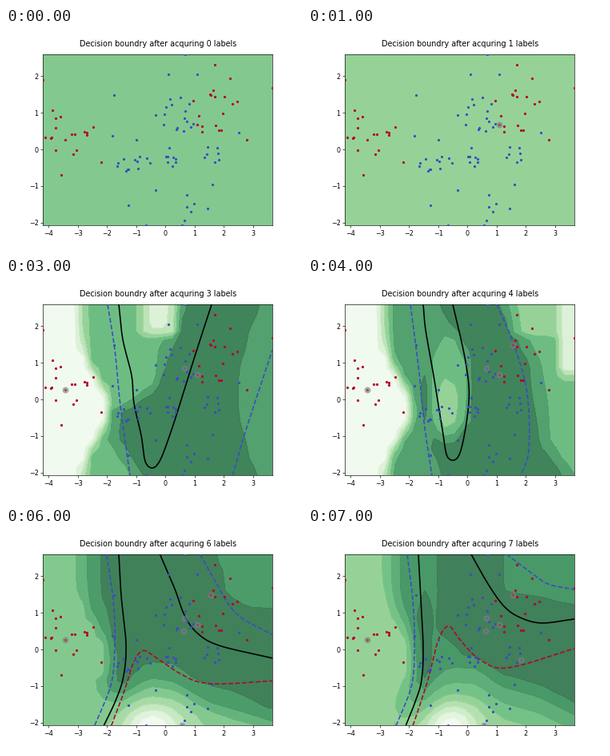
Write a matplotlib script that moves like this. It is 370 by 278 pixels and loops after 8000 ms.

```python
import numpy as np
import matplotlib.pyplot as plt
from matplotlib.animation import FuncAnimation

W, H, DPI = 370, 278, 57.8125
plt.rcParams["font.family"] = "DejaVu Sans"
fig = plt.figure(figsize=((W + .001) / DPI, (H + .001) / DPI), dpi=DPI)
ax = fig.add_axes([.125, .11, .775, .77])
XLIM, YLIM = (-4.192, 3.664), (-2.078, 2.585)
L, R, T, B = 46.25, 333, 33.36, 247.42
BLUE, RED = plt.cm.coolwarm(0.0), plt.cm.coolwarm(1.0)


def to_data(p):
    """Stage pixels to data units."""
    x = np.interp(p[:, 0], [L, R], XLIM)
    y = np.interp(p[:, 1], [T, B], YLIM[::-1])
    return np.column_stack([x, y])


def pts(flat):
    return np.array(flat, float).reshape(-1, 2)


def green(v, alpha=.75):
    return 1 - alpha + alpha * np.array(plt.cm.Greens(float(v))[:3])


# --- samples: a few fixed outliers, the rest in seeded clusters ---
rng = np.random.default_rng(4)


def cluster(n, cx, cy, rx, ry):
    r, a = np.sqrt(rng.random(n)), rng.uniform(0, 2 * np.pi, n)
    return np.column_stack([cx + rx * r * np.cos(a), cy + ry * r * np.sin(a)])


# in the order they get labelled
labelled = pts([239, 121, 74, 140.3, 223, 113, 256, 84.5, 219.5, 247,
                221.5, 129.5, 266, 165])
is_red = np.array([1, 1, 0, 1, 0, 0, 0], bool)

reds = np.vstack([
    labelled[is_red],
    pts([46, 65.5, 57.5, 103.5, 69, 184, 118.5, 168.5, 108.5, 124.5,
         261, 46, 279.5, 63, 333, 75, 301, 140.5, 289, 92.5, 234, 91.5]),
    cluster(14, 75, 137, 27, 30), cluster(12, 260, 103, 24, 37)])
blues = np.vstack([
    labelled[~is_red],
    pts([224, 33.5, 203, 58.5, 238.5, 58.5, 134.5, 84.5, 291, 131.5,
         152.5, 222, 175, 247.5, 252, 226.5, 133, 135, 163, 140, 187, 203,
         257.5, 196]),
    cluster(14, 212, 110, 26, 24), cluster(8, 207, 160, 9, 16),
    cluster(12, 157, 169, 27, 11), cluster(6, 257, 160, 10, 20),
    cluster(5, 222, 225, 17, 18)])

# --- uncertainty fields on a coarse grid, in stage pixels ---
gx, gy = np.linspace(L, R, 24), np.linspace(T, B, 20)
X, Y = np.meshgrid(gx, gy)
# all fields bulge around the left cluster
EDGE = 94 + 35 * np.exp(-((Y - 163) / 50) ** 2)


def by_y(ys, xs):
    return np.interp(Y, ys, xs)


def by_x(xs, ys):
    return np.interp(X, xs, ys)


def box(cx, cy, rx, ry):
    return np.minimum(rx - abs(X - cx), ry - abs(Y - cy))


def oval(cx, cy, rx, ry):
    return (1 - np.hypot((X - cx) / rx, (Y - cy) / ry)) * min(rx, ry)


def bump(cx, cy, rx, ry):
    return np.exp(-((X - cx) / rx) ** 2 - ((Y - cy) / ry) ** 2)


def put(z, band, n, depth, soft=12):
    """Blend z to the middle of a band where depth is positive."""
    return z + ((band + .5) / n - z) * np.clip(.5 + depth / soft, 0, 1)


def field3(n=7):
    z = put(.5 / n, 4, n, X - EDGE)
    left = by_y([33, 80, 130, 150, 165, 200, 247],
                [226, 212, 192, 180, 146, 142, 172])
    right = 291 + 24 * ((Y - 145) / 105) ** 2
    z = put(z, 5, n, X - left + 16)
    z = put(z, 4, n, oval(172, 115, 18, 24))
    z = put(z, 6, n, np.minimum(X - left, right - X))
    return put(z, 1, n, box(191, 30, 20, 40))


def field4(n=7):
    z = put(.5 / n, 4, n, X - EDGE)
    right = by_y([33, 110, 206, 247], [238, 277, 288, 318])
    left = by_y([33, 100, 180, 205, 247], [165, 197, 203, 152, 168])
    z = put(z, 5, n, np.minimum(X - EDGE - 10, right + 16 - X))
    z = put(z, 6, n, np.minimum(X - left, right - X))
    z = put(z, 6, n, oval(146, 150, 9, 28))
    z = put(z, 4, n, oval(177, 135, 24, 65))
    z = put(z, 3, n, oval(174, 158, 14, 34))
    z = put(z, 3, n, box(287, 30, 28, 42))
    return put(z, 1, n, box(333, 60, 20, 62))


def field5(n=8):
    low = by_x([120, 150, 180, 210, 260, 333], [192, 196, 178, 184, 212, 230])
    right = by_y([33, 90, 110, 160, 200], [272, 280, 302, 304, 340])
    z = put(5.5 / n, 6, n, X - 250)
    z = put(z, 7, n, np.minimum(X - EDGE - 2, right - X))
    z = put(z, 4, n, np.minimum(Y - low - 13, X - 97), 24)
    return z - .6 * bump(188, 250, 42, 28) * (Y > low)


def field7(n=9):
    low = by_x([100, 140, 176, 212, 240, 290, 333],
               [195, 199, 172, 174, 196, 210, 232])
    left = by_y([33, 128, 152], [160, 162, 190])
    z = put(4.5 / n, 7, n, X - EDGE - 10, 30)
    z = put(z, 8, n, np.minimum(X - left, low - 14 - Y))
    z = put(z, 8, n, oval(145, 140, 11, 62))
    z = put(z, 7, n, np.minimum(X - 245, 78 + (X - 245) / 5 - Y))
    z = put(z, 4, n, np.minimum(Y - low - 22, X - 97), 60)
    return z - .5 * bump(180, 250, 30, 26) * (Y > low)


# --- decision curves: p = 0.5 in black, confident levels dashed ---
def smooth(flat, n=160):
    """Catmull-Rom curve through the key points."""
    p = pts(flat)
    q = np.vstack([2 * p[0] - p[1], p, 2 * p[-1] - p[-2]])
    t = np.linspace(0, len(p) - 1, n)
    i = np.minimum(t.astype(int), len(p) - 2)
    u = (t - i)[:, None]
    a, b, c, d = q[i], q[i + 1], q[i + 2], q[i + 3]
    return .5 * (2 * b + (c - a) * u + (2 * a - 5 * b + 4 * c - d) * u**2
                 + (3 * b - a - 3 * c + d) * u**3)


def curves(*rows):
    return [(smooth(p), color) for color, p in rows]


curves3 = curves(
    ("black", [141, 33, 146, 77, 157, 122, 160, 157, 169, 197, 175, 232,
               189, 234, 206, 193, 236, 98, 257, 33]),
    (BLUE, [127, 33, 136, 90, 143, 160, 155, 248]),
    (BLUE, [283, 248, 300, 190, 333, 90]))
curves4 = curves(
    ("black", [144, 33, 147, 65, 157, 122, 168, 190, 175, 225, 190, 219,
               201, 155, 197, 105, 181, 33]),
    (BLUE, [128, 33, 138, 110, 145, 180, 155, 248]),
    (BLUE, [236, 33, 258, 85, 274, 145, 276, 215, 266, 248]))
curves5 = curves(
    ("black", [144, 33, 147, 80, 156, 140, 152, 180, 140, 215, 122, 248]),
    ("black", [181, 33, 196, 80, 201, 120, 212, 150, 240, 175, 333, 212]),
    (BLUE, [128, 33, 138, 100, 139, 150, 133, 195, 111, 248]),
    (BLUE, [237, 33, 252, 80, 263, 120, 285, 155, 333, 190]),
    (RED, [132, 248, 145, 222, 160, 190, 176, 184, 210, 195, 250, 212,
           333, 232]))
curves7 = curves(
    ("black", [138, 33, 141, 90, 144, 150, 142, 190, 135, 215, 122, 248]),
    ("black", [204, 33, 225, 70, 245, 98, 265, 112, 292, 119, 333, 114]),
    (BLUE, [124, 33, 131, 90, 133, 140, 130, 195, 110, 248]),
    (BLUE, [248, 33, 275, 53, 300, 70, 333, 77]),
    (RED, [131, 248, 150, 190, 163, 140, 176, 123, 190, 140, 215, 165,
           250, 175, 333, 151]))
curves6 = [((p + q) / 2, color)
           for (p, color), (q, _) in zip(curves5, curves7)]

# per label count: field, number of bands, curves
STAGES = [
    (np.full_like(X, 5.5 / 9.8), 8, []),
    (np.full_like(X, .5), 7, []),
    (np.full_like(X, .5), 7, []),
    (field3(), 7, curves3),
    (field4(), 7, curves4),
    (field5(), 8, curves5),
    ((field5() + field7()) / 2, 8, curves6),
    (field7(), 9, curves7)]

ax.set(xlim=XLIM, ylim=YLIM, xticks=range(-4, 4), yticks=range(-2, 3))
title = ax.set_title("", fontsize=12, pad=12.9)
for group, color in ((reds, RED), (blues, BLUE)):
    ax.scatter(*to_data(group).T, s=6, color=[color], lw=1.5, zorder=4)
GRID = np.linspace(*XLIM, len(gx)), np.linspace(*YLIM[::-1], len(gy))
drawn = []


def draw(count):
    while drawn:
        drawn.pop().remove()
    title.set_text(f"Decision boundry after acquring {count} labels")
    z, n, lines = STAGES[count]
    if np.ptp(z) == 0:
        ax.set_facecolor(green((int(z[0, 0] * n) + .5) / n))
    else:
        z = np.clip(z, .01, .99)
        levels = np.linspace(0, 1, n + 1)
        drawn.append(ax.contourf(*GRID, z, levels, zorder=1, antialiased=False,
                                 colors=[green(v + .5 / n) for v in levels[:-1]]))
        drawn.append(ax.contour(*GRID, z, levels[1:-1], zorder=1.5,
                                linewidths=.7, colors=[
                                    green(v) for v in np.linspace(0, 1, n - 1)]))
    for p, color in lines:
        style = "-" if color == "black" else "--"
        drawn.extend(ax.plot(*to_data(p).T, style, color=color, zorder=3,
                             lw=2))
    if count:
        drawn.append(ax.scatter(*to_data(labelled[:count]).T, s=70,
                                color="gray", alpha=.55, lw=1.5, zorder=5))


anim = FuncAnimation(fig, draw, frames=8, interval=1000, repeat=True,
                     init_func=lambda: draw(0))
plt.show()
```
